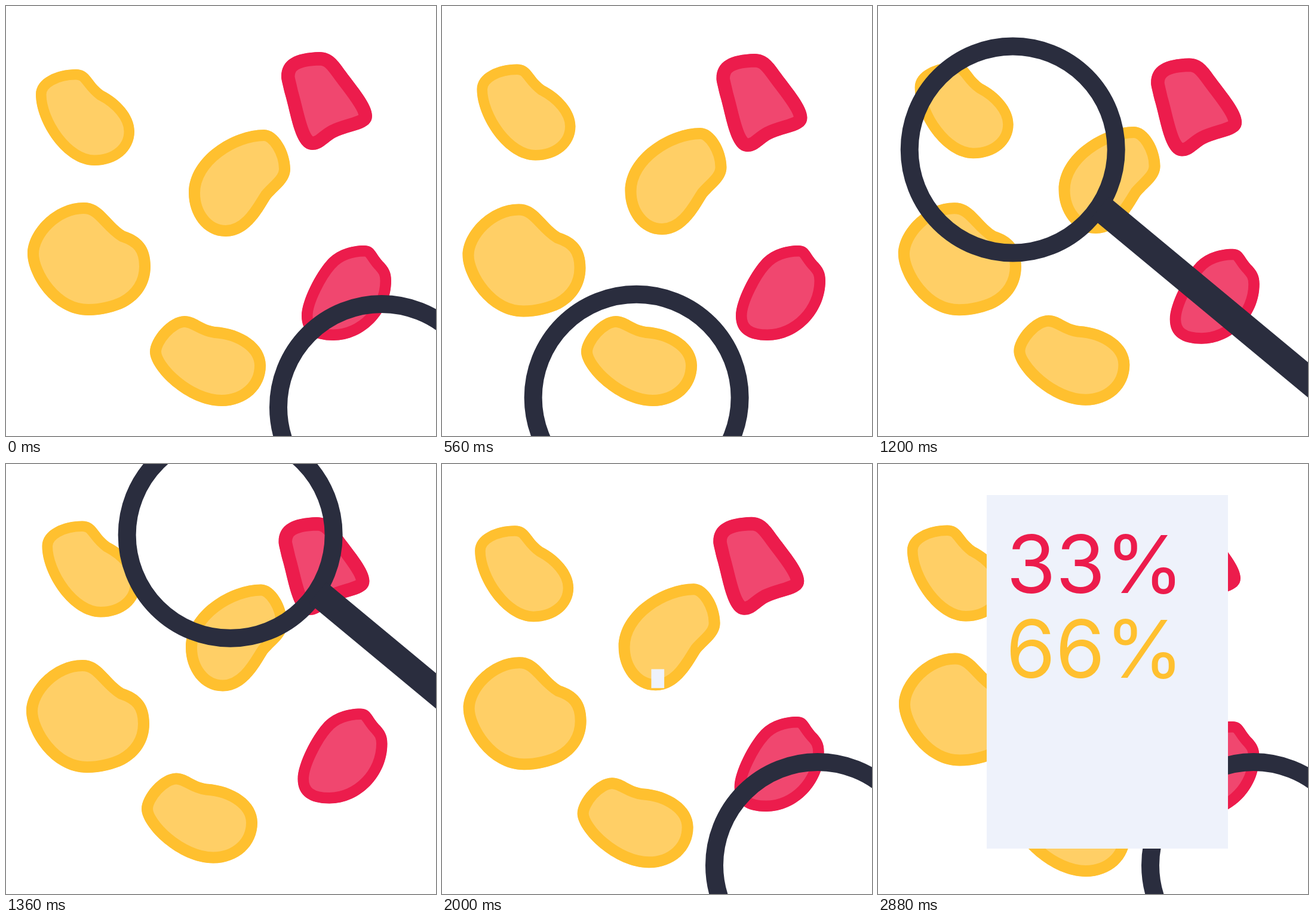
Write an HTML page with a canvas that moves like this. It is 720x720 px and loops after 2960 ms.

```html
<!DOCTYPE html>
<html lang="en">
<head>
<meta charset="utf-8">
<style>
  html, body { margin: 0; width: 100%; height: 100%; overflow: hidden; background: #fff; }
  canvas { display: block; width: 100vw; height: 100vh; }
</style>
</head>
<body>
<canvas id="stage" width="720" height="720"></canvas>
<script>
const ctx = document.getElementById('stage').getContext('2d');
const LOOP = 2960, STEP = 80;
const YELLOW = { edge: '#ffc02f', fill: '#ffcf66' };
const RED = { edge: '#ec1c4c', fill: '#f0476f' };
const INK = '#2a2d3e', PAPER = '#eef2fb';

// Each blob drifts through these offsets at the shared drift times.
const DRIFT_TIMES = [0, 560, 960, 1360, 1680, 2320, 2880];
const blob = (color, border, outline, drift) =>
  ({ color, border, shape: new Path2D(outline), drift });

const blobs = [
  blob(YELLOW, 17.5,
    'M117 106C141 106 141 126 163 142C190 156 215 182 215 210C215 243 186 267 148 267C97 267 50 196 50 148C50 121 85 106 117 106Z',
    [[0, 0], [8.5, -8.5], [12.5, -12.5], [10.5, -10.5], [8, -6], [2.5, -1], [-1, -3.5]]),
  blob(YELLOW, 19,
    'M130 329C162 329 172 360 199 377C226 386 242 402 242 436C242 466 226 490 200 504C184 512 160 518 138 518C76 518 36 450 36 415C36 376 80 329 130 329Z',
    [[0, 0], [-1.5, 2.5], [-2, 2], [-2, -1], [-1, -3.5], [0, -8], [-1, -12.5]]),
  blob(YELLOW, 19,
    'M432 207C456 207 476 244 476 273C476 294 457 306 443 322C432 338 410 386 368 386C330 386 306 350 306 313C306 252 380 207 432 207Z',
    [[0, 0], [0.5, -3], [-1.5, -4.5], [-5, -5.5], [-9, -6.5], [-11, -7], [-11, -7]]),
  blob(YELLOW, 19,
    'M299 519C318 519 328 534 350 537C396 540 435 566 435 602C435 641 403 670 361 670C303 670 241 610 241 579C241 556 272 519 299 519Z',
    [[0, 0], [-8, 0], [-12.5, -0.5], [-14, -1.5], [-14.5, 1], [-14, 12], [-13, 21]]),
  blob(RED, 22.5,
    'M525 77C546 77 556 92 569 110C588 136 613 164 613 184C613 208 578 207 552 220C537 228 530 241 513 241C484 241 478 183 467 147C462 125 461 123 461 118C461 90 484 78 525 77Z',
    [[0, 0], [-1.5, 3], [-3, 8], [-4.5, 12], [-6, 13], [-7, 10], [-6, 7]]),
  blob(RED, 18.5,
    'M600 401C618 401 618 415 633 430C640 438 645 445 645 460C645 514 600 560 548 560C515 560 495 547 495 519C495 492 520 446 537 427C553 408 578 401 600 401Z',
    [[0, 0], [-3, 0], [-5.5, 2.5], [-6.5, 8.5], [-6, 16], [-5, 27], [-6.5, 30]])
];

// Lens flight: quadratic arcs, each eased in and out.
const HOME = [629, 672], LEFT = [116, 588], TOP = [407, 114];
const flight = [
  { start: 0, end: 960, from: HOME, bend: [408, 707], to: LEFT },
  { start: 960, end: 1440, from: LEFT, bend: [190, 130], to: TOP },
  { start: 1440, end: 1920, from: TOP, bend: [772, 265], to: HOME }
];

const progress = (t, start, end) => Math.min(1, Math.max(0, (t - start) / (end - start)));
const ease = u => u * u * (3 - 2 * u);

// Smooth interpolation with unevenly spaced times.
function driftAt(points, t) {
  const T = DRIFT_TIMES, last = T.length - 1;
  let i = 0;
  while (i < last - 1 && t >= T[i + 1]) i++;
  const span = T[i + 1] - T[i], u = progress(t, T[i], T[i + 1]), s = ease(u);
  return [0, 1].map(axis => {
    const slope = k => {
      const a = Math.max(0, k - 1), b = Math.min(last, k + 1);
      return (points[b][axis] - points[a][axis]) / (T[b] - T[a]);
    };
    return points[i][axis] * (1 - s) + points[i + 1][axis] * s +
      span * u * (1 - u) * ((1 - u) * slope(i) - u * slope(i + 1));
  });
}

function lensAt(t) {
  const arc = flight.find(a => t < a.end);
  if (!arc) return HOME;
  const u = ease(progress(t, arc.start, arc.end)), v = 1 - u;
  return [0, 1].map(k => v * v * arc.from[k] + 2 * u * v * arc.bend[k] + u * u * arc.to[k]);
}

function drawBlob({ color, border, shape, drift }, t) {
  ctx.save();
  ctx.translate(...driftAt(drift, t));
  ctx.clip(shape);
  ctx.fillStyle = color.fill;
  ctx.fill(shape);
  ctx.strokeStyle = color.edge;
  ctx.lineWidth = border * 2;
  ctx.stroke(shape);
  ctx.restore();
}

function drawLens(t) {
  ctx.save();
  ctx.translate(...lensAt(t));
  ctx.strokeStyle = INK;
  ctx.lineWidth = 30;
  ctx.beginPath();
  ctx.arc(0, 0, 173, 0, Math.PI * 2);
  ctx.stroke();
  ctx.lineWidth = 45.5;
  ctx.beginPath();
  ctx.moveTo(146, 96.5);
  ctx.lineTo(560, 440);
  ctx.stroke();
  ctx.restore();
}

function drawReport(t) {
  const scale = ease(progress(t, 1920, 2490));
  if (!scale) return;
  ctx.save();
  ctx.translate(360, 360);
  ctx.scale(scale, scale);
  ctx.translate(-360, -360);
  ctx.fillStyle = PAPER;
  ctx.fillRect(182, 52, 404, 592);
  ctx.globalAlpha = progress(t, 2480, 2720);
  ctx.font = '400 134px Inter, sans-serif';
  ctx.fillStyle = RED.edge;
  ctx.fillText('33%', 215, 216);
  ctx.fillStyle = YELLOW.edge;
  ctx.fillText('66%', 214, 358);
  ctx.restore();
}

function draw(now) {
  const t = Math.floor((now % LOOP) / STEP) * STEP;
  ctx.clearRect(0, 0, 720, 720);
  blobs.forEach(b => drawBlob(b, t));
  drawLens(t);
  drawReport(t);
}

let began;
function tick(now) {
  began ??= now;
  draw(now - began);
  requestAnimationFrame(tick);
}
requestAnimationFrame(tick);
</script>
</body>
</html>
```
